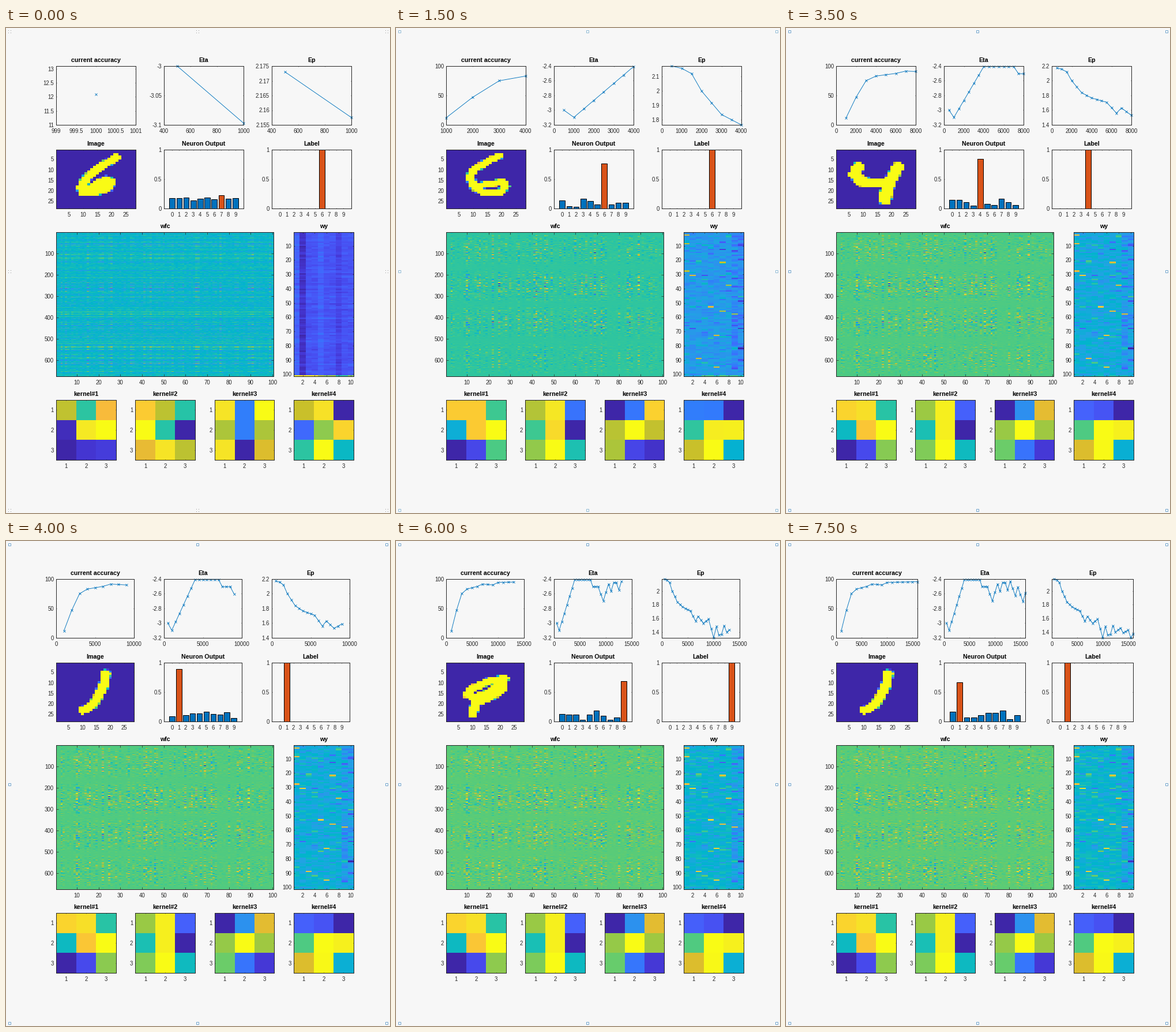
A matplotlib script that plays this animation: 666x841 px, repeating every 8000 ms.

```python
import numpy as np
import matplotlib.pyplot as plt
from matplotlib.animation import FuncAnimation
from matplotlib.colors import LinearSegmentedColormap

W, H, DPI = 666, 841, 100
STEPS, INTERVAL = 16, 500
PX = 72 / DPI
BG, INK, BLUE, RED = "#f7f7f7", "#262626", "#0072bd", "#d95319"

plt.rcParams["font.family"] = "Liberation Sans"
plt.rcParams["axes.unicode_minus"] = False

STOPS = ["#3e26a8", "#4537d5", "#484df0", "#4563fd", "#327cfc", "#2d91ef",
         "#20a5e3", "#01b4ce", "#19bfb6", "#37c897", "#64cd6f", "#9dc943",
         "#d1bf27", "#f8ba3d", "#fccf30", "#f5e924", "#f9fb15"]
PARULA = LinearSegmentedColormap.from_list(
    "parula", list(zip(np.append(np.arange(0, 64, 4), 63) / 63, STOPS)))


def settle(k, tau):
    """Exponential approach from 0 to 1."""
    return 1 - np.exp(-k / tau)


def through(x, points):
    return np.interp(x, *zip(*points))


# Accuracy every 1000 samples, error and log learning rate every 500
ACC = through(np.arange(1, 17), [
    (1, 12.1), (2, 47), (3, 75), (4, 83), (6, 87.5), (7, 91.5), (9, 90),
    (10, 94.3), (16, 95.5)])
EP = through(np.arange(1, 33), [
    (1, 2.173), (2, 2.1575), (3, 2.12), (4, 2.0), (6, 1.838), (8, 1.766),
    (11, 1.708), (13, 1.56), (14, 1.63), (16, 1.53), (18, 1.59), (20, 1.316),
    (21, 1.48), (22, 1.36), (23, 1.365), (24, 1.495), (25, 1.4), (27, 1.46),
    (28, 1.39), (30, 1.43), (31, 1.32), (32, 1.375)])
RATE_STEP = {"+": 0.115, "-": -0.097, "0": 0}
RATE_MOVES = "-" + "+" * 6 + "0" * 6 + "-00--++-+0-+--+--+"
ETA = -3 + np.cumsum([0] + [RATE_STEP[m] for m in RATE_MOVES])

# Kernel weights in percent: random start and learned state
KERNELS = [
    ([74, 55, 83, 3, 95, 100, 0, 6, 8], [90, 93, 54, 48, 86, 100, 0, 12, 68]),
    ([88, 74, 54, 100, 54, 1, 80, 94, 74], [68, 95, 18, 50, 95, 0, 65, 98, 47]),
    ([94, 27, 100, 72, 27, 72, 94, 1, 78], [0, 32, 79, 69, 100, 70, 64, 24, 7]),
    ([75, 93, 0, 21, 68, 90, 55, 100, 47], [18, 14, 0, 60, 99, 96, 77, 98, 42]),
]

# Handwritten digits: label, pen radius, stroke points
SIX_A = (6, 1.7, [(21.5, 4.5), (16, 9), (11, 14.5), (9.5, 18.5), (10, 21),
                  (14, 21), (18.5, 19), (20, 16), (18, 14.8), (11.5, 19.5)])
SIX_B = (6, 1.5, [(19, 3.8), (15.5, 6), (10, 10.5), (9, 14), (10.5, 18.5),
                  (13.5, 21), (19.5, 21), (21.5, 18), (20.5, 16), (12, 17.8)])
NINE_A = (9, 2.0, [(20.5, 9.5), (19, 8.4), (14.5, 8.4), (9.5, 11.5), (9.5, 13),
                   (14, 13.8), (20.5, 11.5), (17, 16), (14, 20.5), (12.5, 25)])
NINE_B = (9, 1.7, [(21.5, 8.2), (16, 9.5), (9.8, 13), (8.3, 16), (10.5, 17.3),
                   (16, 15), (21, 9.8), (21, 13), (16.5, 17), (11, 20), (10, 25)])
FOUR = (4, 2.2, [(8.3, 8.8), (7, 12.5), (9.5, 15.9), (14, 16.6), (18.5, 16.3),
                 (20.5, 13.5), (22.2, 8.8), (19.5, 16), (18, 21), (17.7, 24.5)])
TWO = (2, 1.8, [(12, 7.8), (15, 6), (20, 5.7), (21, 8.5), (20.5, 13), (18, 17),
                (5, 19.2), (14, 18.2), (18, 20.5), (21, 22)])
ONE = (1, 1.8, [(18.3, 5.8), (17.8, 11), (15.5, 17), (13.5, 21), (10, 23.3)])
ZERO = (0, 1.6, [(15, 5.5), (10, 9), (8, 15), (10, 21), (14, 22.5), (19, 19),
                 (20.5, 12), (18, 6.5), (15, 5.5)])
SEVEN = (7, 1.6, [(7, 8), (20.5, 7.5), (18, 13), (15, 18), (13, 24.5)])
THREE = (3, 1.6, [(9, 6), (15, 5), (18.5, 8), (13, 13), (18.5, 16), (19, 20),
                  (14, 23), (8, 21.5)])
DIGITS = [SIX_A, ZERO, SEVEN, SIX_B, THREE, NINE_A, SEVEN, FOUR, ONE, ZERO,
          TWO, THREE, NINE_B, ZERO, SEVEN, ONE]
CONFIDENCE = [(0, .23), (3, .76), (5, .73), (7, .84), (10, 1), (12, .69),
              (15, .67)]


def raster(radius, points):
    y, x = np.mgrid[1:29, 1:29].astype(float)
    dist = np.full(x.shape, 99.0)
    for (ax, ay), (bx, by) in zip(points, points[1:]):
        dx, dy = bx - ax, by - ay
        t = np.clip(((x - ax) * dx + (y - ay) * dy) / (dx * dx + dy * dy), 0, 1)
        dist = np.minimum(dist, np.hypot(x - ax - t * dx, y - ay - t * dy))
    return np.clip((radius + 0.15 - dist) * 4, 0, 1)


def outputs(k):
    """Spread of guesses; the untrained net is nearly even and wrong."""
    rng = np.random.default_rng(40 + k)
    out = rng.uniform(0.03, 0.19, 10) if k else rng.uniform(0.13, 0.19, 10)
    out[DIGITS[k][0] if k else 7] = through(k, CONFIDENCE)
    return out


def kernel(k, start, end):
    w = np.array(start) + (np.array(end) - start) * settle(k, 1.5)
    return ((w - w.min()) / np.ptp(w)).reshape(3, 3)


# Fully connected layer: four stacked 13x13 feature maps by 100 neurons
rng = np.random.default_rng(3)
row = np.arange(676)
block = row // 169
envelope = (np.sin(np.pi * (row % 169 + 0.5) / 169)
            * np.sin(np.pi * (row % 13 + 0.5) / 13))
neuron = 0.02 + 0.18 * rng.random(100) ** 2.5
neuron[[9, 10, 24, 40, 41, 45, 59, 68, 88]] = 0.2
FC_NOISE = rng.standard_normal((676, 100)) * neuron
early_row = rng.standard_normal(676) * (0.3 + envelope)
early_col = 0.1 + rng.random(100) ** 2
FC_EARLY = (0.09 * early_row[:, None] * early_col
            + 0.03 * rng.standard_normal((676, 1))
            + 0.025 * rng.standard_normal((676, 100)))

# Output layer: 100 neurons and a bias row by 10 classes
CELLS = (101, 10)
WY_NOISE = 0.035 * rng.standard_normal(CELLS)
WY_NOISE += (rng.random(CELLS) < 0.12) * rng.normal(-0.02, 0.11, CELLS)
WY_NOISE += 0.42 * (rng.random(CELLS) < 0.012)
WY_NOISE[:, 8:] -= rng.exponential(0.06, (101, 2))
WY_EARLY = 0.15 + 0.015 * (rng.standard_normal(CELLS)
                           + rng.standard_normal((101, 1)))
WY_EARLY[:, [0, 4]] += 0.04
WY_EARLY[:, [1, 7]] -= [0.1, 0.04]
WY_EARLY[100] = rng.uniform(0.5, 1, 10)


def fc_weights(k):
    m = settle(k, 1)
    base = 0.46 + 0.165 * settle(k, 3.5)
    scale = np.array([.75, 1, .9, .45 + .03 * k])[block] * envelope
    return base + (1 - m) * FC_EARLY + m * scale[:, None] * FC_NOISE * 1.3


def wy_weights(k):
    m = settle(k, 1)
    late = 0.3 + 0.17 * settle(k, 7) + WY_NOISE
    late[100, 3:] += 0.45 * np.exp(-k / 4)
    return (1 - m) * WY_EARLY + m * late


fig = plt.figure(figsize=(W / DPI, H / DPI), dpi=DPI, facecolor=BG)
stage = fig.add_axes([0, 0, 1, 1])


def place(ax, left, top, right, bottom):
    ax.set_position([left / W, 1 - bottom / H, (right - left) / W,
                     (bottom - top) / H])


def panel(left, top, right, bottom):
    ax = fig.add_axes([0, 0, 0.1, 0.1])
    ax.box = (left, top, right, bottom)
    place(ax, *ax.box)
    return ax


upper = [panel(x, top, x + 138, top + 102)
         for top in (66, 211) for x in (87, 274, 461)]
acc_ax, eta_ax, ep_ax, img_ax, out_ax, lab_ax = upper
fc_ax = panel(87, 354, 464, 604)
wy_ax = panel(499, 354, 603, 604)
kernel_axes = [panel(87 + 137.3 * i, 645, 190.8 + 137.3 * i, 749)
               for i in range(4)]


def dress(ax, title, xlim, ylim, xticks, yticks):
    for axis, ticks, lim in ((ax.xaxis, xticks, xlim), (ax.yaxis, yticks, ylim)):
        lo, hi = sorted(lim)
        ticks = [t for t in ticks if lo - 1e-6 <= t <= hi + 1e-6]
        axis.set_ticks(ticks, labels=[f"{t:g}" for t in ticks])
    ax.set_xlim(xlim)
    ax.set_ylim(ylim)
    left, top, right, bottom = ax.box
    length = 0.01 * max(right - left, bottom - top) * PX
    ax.tick_params(direction="in", length=length, width=0.5, color=INK,
                   labelcolor=INK, labelsize=9.65 * PX, top=True, right=True)
    ax.tick_params(axis="x", pad=6.3 * PX)
    ax.tick_params(axis="y", pad=4 * PX)
    ax.set_facecolor(BG)
    for spine in ax.spines.values():
        spine.set(color=INK, linewidth=PX)
    ax.set_title(title, fontsize=10.6 * PX, fontweight="bold", color="black",
                 pad=6.7 * PX, y=1)


def heat(ax, data, title, xticks, yticks):
    rows, cols = data.shape
    ax.imshow(data, cmap=PARULA, vmin=0, vmax=1, aspect="auto",
              interpolation="nearest", extent=(.5, cols + .5, rows + .5, .5))
    dress(ax, title, (.5, cols + .5), (rows + .5, .5), xticks, yticks)


def nice(lo, hi, most=4.4):
    """Round limits and ticks; limits stay tight if rounding wastes space."""
    span = hi - lo
    step = next(m * 10.0 ** e for e in range(-3, 5) for m in (1, 2, 5)
                if span / (m * 10.0 ** e) <= most)
    a, b = np.floor(lo / step + 1e-6), np.ceil(hi / step - 1e-6)
    ticks = np.round(np.arange(a, b + 1) * step, 6) + 0.0
    waste = max(lo - ticks[0], ticks[-1] - hi)
    if b - a < 5 and waste < 0.21 * span:
        lo, hi = ticks[0], ticks[-1]
    return (lo, hi), ticks


def curve(ax, title, x, y, x_axis, y_axis):
    ax.plot(x, y, color=BLUE, lw=0.65, marker="x", ms=5 * PX, mew=0.6,
            clip_on=False)
    (xlim, xticks), (ylim, yticks) = x_axis, y_axis
    dress(ax, title, xlim, ylim, xticks, yticks)


def bars(ax, title, values):
    best = int(np.argmax(values))
    shown = np.flatnonzero(values)
    ax.bar(shown, values[shown], 0.8, edgecolor="black", linewidth=PX,
           color=[RED if i == best else BLUE for i in shown])
    dress(ax, title, (-1.17, 10.17), (0, 1), range(10), (0, .5, 1))


def draw_curves(k):
    n = k + 1
    end = 1000 * n
    most = 5 if n < 6 else 4.4
    half = 500 * np.arange(1, 2 * n + 1)
    eta, ep = ETA[:2 * n], EP[:2 * n]
    acc_y = nice(ACC[0], ACC[k]) if n < 4 else nice(0, 100)
    x_axis = nice({1: 400, 2: 500}.get(n, 0), end, most)
    acc_x = nice(1000, end, most) if 1 < n < 6 else x_axis
    if n == 1:
        acc_x, acc_y = nice(999, 1001), nice(11, 13.1)

    # Five-digit tick labels change the width of the upper panels
    right = x_axis[0][1]
    shift = 0 if right < 10000 else 3.3 if right % 5000 else -3
    for ax in upper:
        x0, y0, x1, y1 = ax.box
        place(ax, x0, y0, x1 + shift, y1)

    curve(acc_ax, "current accuracy", half[1::2], ACC[:n], acc_x, acc_y)
    curve(eta_ax, "Eta", half, eta, x_axis, nice(eta.min(), eta.max()))
    curve(ep_ax, "Ep", half, ep, x_axis, nice(ep.min(), ep.max()))


def draw_marks(k):
    stage.set(xlim=(0, W), ylim=(H, 0))
    stage.axis("off")
    x, y = np.array([(x, y) for x in (5.5, 331.5, 660)
                     for y in (6, 421.5, 835.5)
                     if (x, y) != (331.5, 421.5)]).T
    if k:
        stage.plot(x, y, ls="", marker="s", ms=4 * PX, mfc="white",
                   mec="#8fb9d3" if k < 5 else "#6fa3cb", mew=0.7)
        return
    for dx in (-2, 2):
        for dy in (-2, 2):
            stage.plot(x + dx, y + dy, ls="", marker="s", ms=PX, mew=0,
                       color="#9a9a9a")


def draw(k):
    for ax in fig.axes:
        ax.clear()
    draw_marks(k)
    draw_curves(k)

    label, radius, points = DIGITS[k]
    fives = range(5, 26, 5)
    heat(img_ax, raster(radius, points), "Image", fives, fives)
    bars(out_ax, "Neuron Output", outputs(k))
    bars(lab_ax, "Label", np.eye(10)[label])

    heat(fc_ax, fc_weights(k), "wfc", range(10, 101, 10), range(100, 601, 100))
    heat(wy_ax, wy_weights(k), "wy", range(2, 11, 2), range(10, 101, 10))
    for i, (ax, ends) in enumerate(zip(kernel_axes, KERNELS), 1):
        heat(ax, kernel(k, *ends), f"kernel#{i}", (1, 2, 3), (1, 2, 3))


anim = FuncAnimation(fig, draw, frames=STEPS, init_func=lambda: None,
                     interval=INTERVAL, repeat=True, repeat_delay=0)
plt.show()
```
